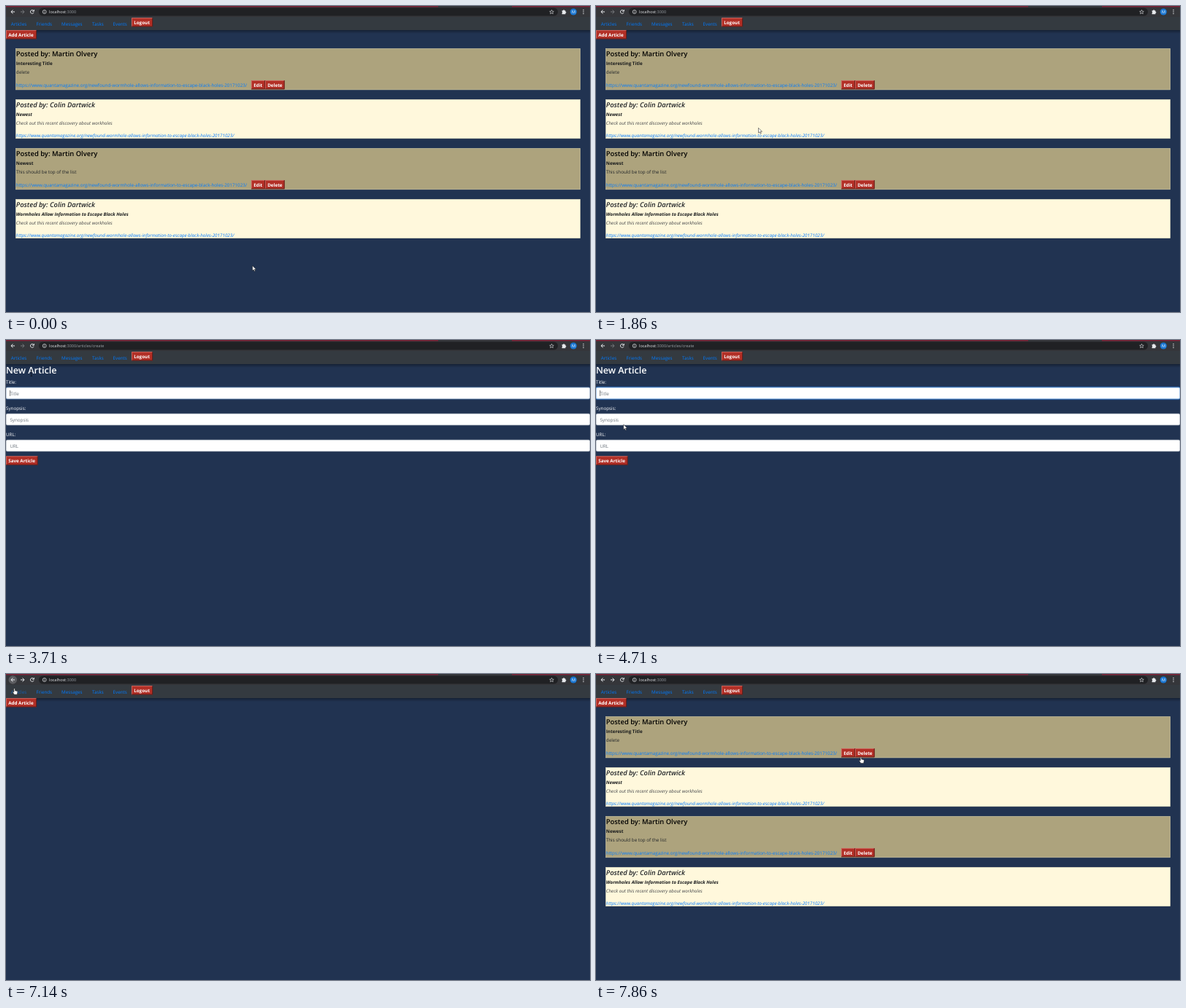
Animation, 800 px wide and 420 px high, one loop 8000 ms. Source, as an HTML page:

```html
<!DOCTYPE html>
<html lang="en">
<head>
<meta charset="utf-8">
<title>Article board</title>
<style>
  html, body { margin: 0; width: 100%; height: 100%; overflow: hidden; background: #213351; }
  svg { display: block; width: 100vw; height: 100vh; }
  text { font: 6.27px "Open Sans", "Noto Sans", sans-serif; text-rendering: geometricPrecision; white-space: pre; }
  .bold { font-weight: 700; }
  .head { font-size: 9.4px; font-weight: 600; }
  .page-head { font-size: 12.55px; font-weight: 600; }
  .address { font-size: 5.5px; }
  .italic { font-style: italic; }
  .link { fill: #007bff; }
  .icon { fill: none; stroke: #e8eaed; stroke-width: 1; }
</style>
</head>
<body>
<svg id="stage" viewBox="0 0 800 420" preserveAspectRatio="none"></svg>
<script>
const LOOP = 8000, STEPS = 56;
const FOCUS_STEP = 26, BACK_STEP = 45, RELOAD_STEP = 51;
const ARTICLE_URL = "https://www.quantamagazine.org/newfound-wormhole-allows-information-to-escape-black-holes-20171023/";

const text = (x, y, str, cls = "", fill = "") =>
  `<text x="${x}" y="${y}" class="${cls}"${fill && ` fill="${fill}"`}>${str}</text>`;
const rect = (x, y, w, h, fill, extra = "") =>
  `<rect x="${x}" y="${y}" width="${w}" height="${h}" fill="${fill}" ${extra}/>`;
const path = (d, extra = 'class="icon"') => `<path d="${d}" ${extra}/>`;
const group = (id, body) => `<g id="${id}">${body}</g>`;

function button(x, y, w, label) {
  const h = 12.2, b = 0.4;
  return rect(x, y, w, h, "#b22f26") +
    path(`M${x + b} ${y + h}V${y + b}H${x + w}`, 'fill="none" stroke="#d4736b" stroke-width=".8"') +
    path(`M${x} ${y + h - b}H${x + w - b}V${y}`, 'fill="none" stroke="#4b1815" stroke-width=".8"') +
    text(x + 3.2, y + 8.5, label, "bold", "#fff");
}

function card(top, own, author, title, synopsis) {
  const slant = own ? "" : " italic";
  const urlY = top + (own ? 52.5 : 51.5);
  return rect(13.4, top + .2, 773.2, own ? 56.4 : 53.4, own ? "#ada37d" : "#fff8dc",
      `stroke="${own ? "#d3cca9" : "#e5dfc4"}" stroke-width=".6"`) +
    text(13.8, top + 10.5, "Posted by: " + author, "head" + slant, own ? "#000" : "#212529") +
    text(13.8, top + 22.5, title, "bold" + slant, "#181a1c") +
    text(13.8, top + 34.9, synopsis, slant, own ? "#212529" : "#44474a") +
    text(13.8, urlY, ARTICLE_URL, "link" + slant) +
    (own ? button(336, urlY - 8.7, 19, "Edit") + button(355, urlY - 8.7, 26.6, "Delete") : "");
}

const field = (y, label) =>
  text(0, y - 5.4, label + ":", "", "#fff") +
  rect(.2, y + .2, 799.6, 15.6, "#fff", 'rx="1.7" stroke="#ced4da" stroke-width=".5"') +
  text(5.4, y + 10.7, label, "", "#6c757d");

const browserBar =
  rect(0, 0, 800, 2, "#7b2035") + rect(592, 0, 101, 2, "#35363a") +
  rect(0, 1.5, 800, 13.5, "#35363a") +
  rect(45, 2.4, 711, 11.2, "#202124", 'rx="5.6"') +
  '<circle id="backHover" cx="9.3" cy="8" r="5.8" fill="#5b5c60"/>' +
  path("M12 8H7M9.4 5.5L6.9 8l2.5 2.5") +
  path("M20 8h5M22.6 5.5L25.1 8l-2.5 2.5", 'id="forward" class="icon"') +
  path("M37.9 6.7A2.4 2.4 0 1 0 38.1 8.8M38.3 5v2.2h-2.2") +
  '<circle class="icon" cx="52.7" cy="8" r="2.5" style="stroke-width:.7"/>' +
  path("M52.7 7.6v1.9M52.7 6.3v.7", 'class="icon" style="stroke-width:.7"') +
  '<text x="59" y="10" class="address" fill="#e8eaed">localhost<tspan id="urlPath" fill="#9aa0a6"></tspan></text>' +
  path("M747.5 5.4l.8 1.8 2 .2-1.5 1.3.5 2-1.8-1-1.8 1 .5-2-1.5-1.3 2-.2z", 'class="icon" style="stroke-width:.6"') +
  path("M761.6 6.2h1.5a1 1 0 0 1 2 0h1.3v1.5a1 1 0 0 1 0 2v1.5h-4.8v-1.6a1 1 0 0 0 0-1.8z", 'fill="#e8eaed"') +
  '<circle cx="777.3" cy="8" r="4.6" fill="#1976d2"/>' +
  text(775.1, 9.8, "M", "address", "#fff") +
  [5.5, 8, 10.5].map(y => `<circle cx="791" cy="${y}" r=".7" fill="#e8eaed"/>`).join("");

const navBar =
  rect(0, 33, 800, 5, "url(#shade)") + rect(0, 15, 800, 18, "#343a40") +
  [[6.8, "Articles"], [41.5, "Friends"], [76, "Messages"], [118, "Tasks"], [146.6, "Events"]]
    .map(([x, label]) => group("nav" + label, text(x, 27.1, label, "link"))).join("") +
  button(172, 16.2, 29, "Logout");

const me = "Martin Olvery", friend = "Colin Dartwick", found = "Check out this recent discovery about workholes";
const cards =
  card(58.3, true, me, "Interesting Title", "delete") +
  card(128.2, false, friend, "Newest", found) +
  card(195.2, true, me, "Newest", "This should be top of the list") +
  card(265.1, false, friend, "Wormholes Allow Information to Escape Black Holes", found);

const form =
  text(0, 46.2, "New Article", "page-head", "#fff") +
  field(65, "Title") + field(101, "Synopsis") + field(137, "URL") +
  group("focusRing",
    rect(-.6, 64.4, 801.2, 17.2, "none", 'rx="2.4" stroke="#007bff" stroke-opacity=".3" stroke-width="1.3"') +
    rect(.2, 65.2, 799.6, 15.6, "none", 'rx="1.7" stroke="#80bdff" stroke-width=".6"')) +
  rect(5.3, 69, .5, 8, "#111", 'id="caret"') +
  button(0, 159.4, 43.6, "Save Article");

const cursors =
  path("M0 0V6.9L1.6 5.4 2.7 7.9 3.8 7.4 2.8 5H5z", 'id="arrow" fill="#fff" stroke="#111" stroke-width=".5"') +
  path("M-.8 .6Q0-.5.7.6V3.2L3.6 3.9Q4.5 4.2 4.3 5.2L3.6 8.6H-.2L-2.5 5.3Q-2.4 4.4-1.6 4.7L-.8 5.4z",
    'id="hand" fill="#fff" stroke="#111" stroke-width=".5"') +
  path("M-1.2-3.5H1.2M0-3.5V4M-1.2 4H1.2", 'id="beam" fill="none" stroke="#10151f" stroke-width=".8"');

document.getElementById("stage").innerHTML =
  '<defs><linearGradient id="shade" x2="0" y2="1"><stop stop-opacity=".35"/><stop offset="1" stop-opacity="0"/></linearGradient></defs>' +
  rect(0, 0, 800, 420, "#213351") + browserBar + navBar +
  group("list", button(0, 33.2, 42, "Add Article") + group("cards", cards)) +
  group("form", form) + group("pointer", cursors);

// Pointer path: step, x, y
const route = [
  [0, 337.6, 356.4], [2, 338, 357.4], [5, 338, 357.4], [11, 227, 174], [12, 227, 174], [13, 222.5, 167.3],
  [20, 33, 43.6], [25, 33, 43.6], [26, 34.8, 45.5], [28, 34.8, 45.5], [32, 40, 132], [36, 31, 68],
  [41, 27.3, 50.2], [44, 9.5, 7.5], [46, 9.5, 7.5], [49, 11.6, 19.6], [51, 11.6, 19.6],
  [52, 50, 34], [53, 180, 72], [55, 363, 113.8]
];

function pointerAt(step) {
  const i = Math.max(1, route.findIndex(p => p[0] >= step));
  const [s0, x0, y0] = route[i - 1], [s1, x1, y1] = route[i];
  const u = (step - s0) / (s1 - s0);
  return [x0 + (x1 - x0) * u, y0 + (y1 - y0) * u];
}

const el = id => document.getElementById(id);
const show = (id, on) => el(id).style.display = on ? "" : "none";
const within = (step, first, last) => step >= first && step <= last;

function render(now) {
  const time = now % LOOP;
  const step = Math.floor((time + 4) * STEPS / LOOP) % STEPS;
  const onForm = within(step, FOCUS_STEP, BACK_STEP - 1);
  const onArticles = within(step, 49, RELOAD_STEP);
  const hand = within(step, 20, 25) || onArticles || step === 55;
  const beam = within(step, 26, 28);
  const sinceFocus = (step - FOCUS_STEP) * LOOP / STEPS;

  show("form", onForm);
  show("list", !onForm);
  show("cards", !within(step, BACK_STEP, RELOAD_STEP - 1));
  show("caret", Math.floor(sinceFocus / 500) % 2 === 0);
  show("backHover", within(step, 44, RELOAD_STEP - 1));
  show("arrow", !hand && !beam);
  show("hand", hand);
  show("beam", beam);
  el("focusRing").style.opacity = step === FOCUS_STEP ? .35 : 1;
  el("forward").style.stroke = step >= BACK_STEP ? "#e8eaed" : "#77797d";
  el("navArticles").style.opacity = onArticles ? .6 : 1;
  el("urlPath").textContent = onForm ? ":3000/articles/create" : ":3000";
  el("pointer").setAttribute("transform", `translate(${pointerAt(step)})`);
  requestAnimationFrame(() => render(performance.now()));
}
render(0);
</script>
</body>
</html>
```
